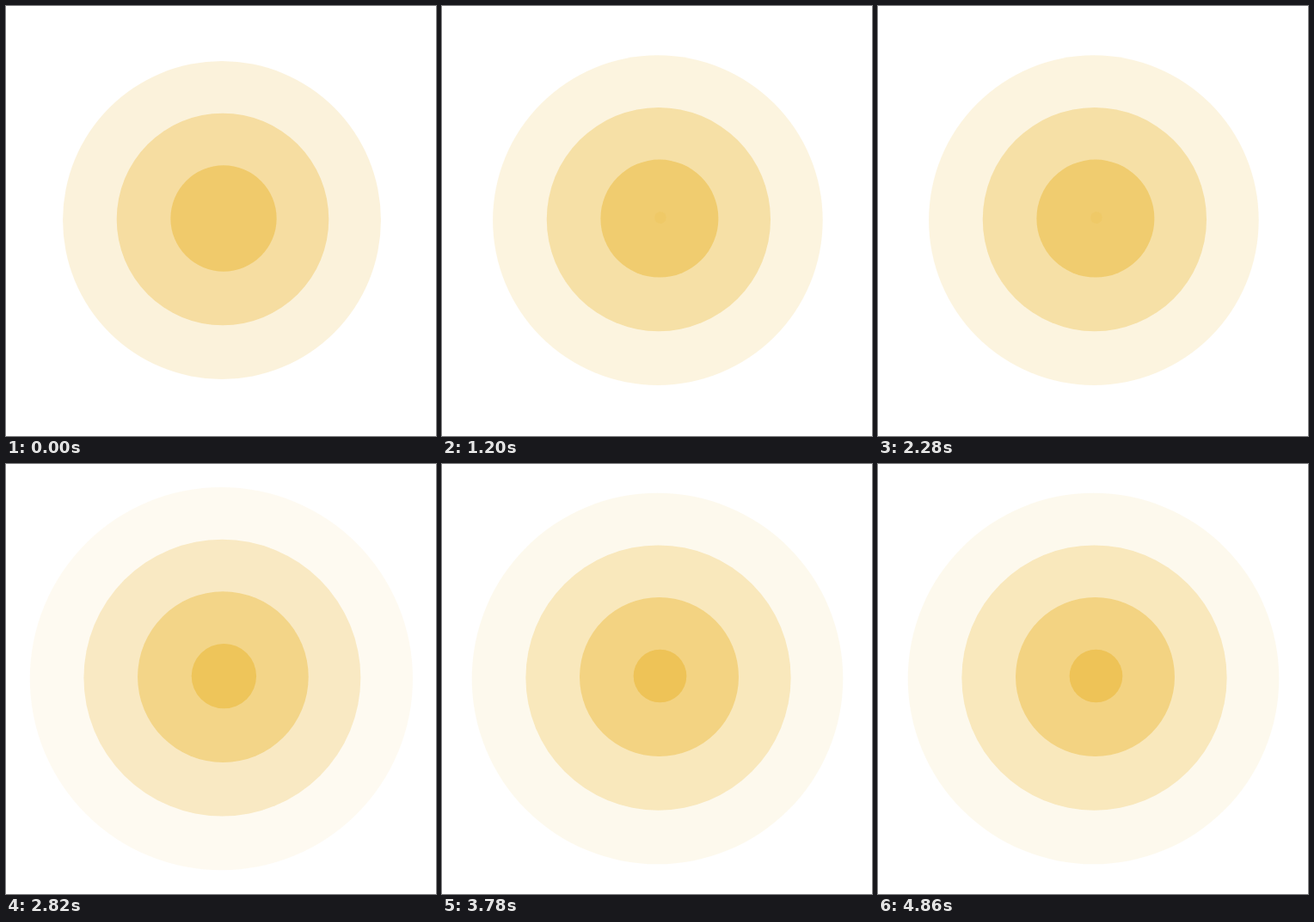
Write an HTML page with a canvas that moves like this. It is 500 px wide and 500 px high and loops after 4890 ms.

```html
<!DOCTYPE html>
<html lang="en">
<head>
<meta charset="utf-8">
<title>Ripples</title>
<style>
  html, body { margin: 0; width: 100%; height: 100%; overflow: hidden; background: #fff; }
  canvas { display: block; }
</style>
</head>
<body>
<canvas id="stage" width="500" height="500"></canvas>
<script>
const ctx = document.getElementById('stage').getContext('2d');
const LOOP = 4890, STEP = 30, INTERVAL = 1080, COUNT = 4;
const MAX_RADIUS = 246.6, FADE_IN = 0.125;

function drawRipple(age) {
  const radius = MAX_RADIUS * age;
  const alpha = 0.75 * (1 - age) * Math.min(1, age / FADE_IN);
  // The centre drifts from (254, 246) to (250, 250) while growing.
  ctx.fillStyle = `rgba(235, 187, 64, ${alpha})`;
  ctx.beginPath();
  ctx.arc(254 - 4 * age, 246 + 4 * age, radius, 0, 2 * Math.PI);
  ctx.fill();
}

function draw(now) {
  const time = Math.floor((now % LOOP) / STEP) * STEP;
  const phase = (time % INTERVAL) / INTERVAL;
  ctx.clearRect(0, 0, 500, 500);
  // Oldest and largest first, so new ripples lie on top.
  for (let i = COUNT - 1; i >= 0; i--) drawRipple((i + phase) / COUNT);
}

const start = performance.now();
function tick() {
  draw(performance.now() - start);
  requestAnimationFrame(tick);
}
tick();
</script>
</body>
</html>
```
